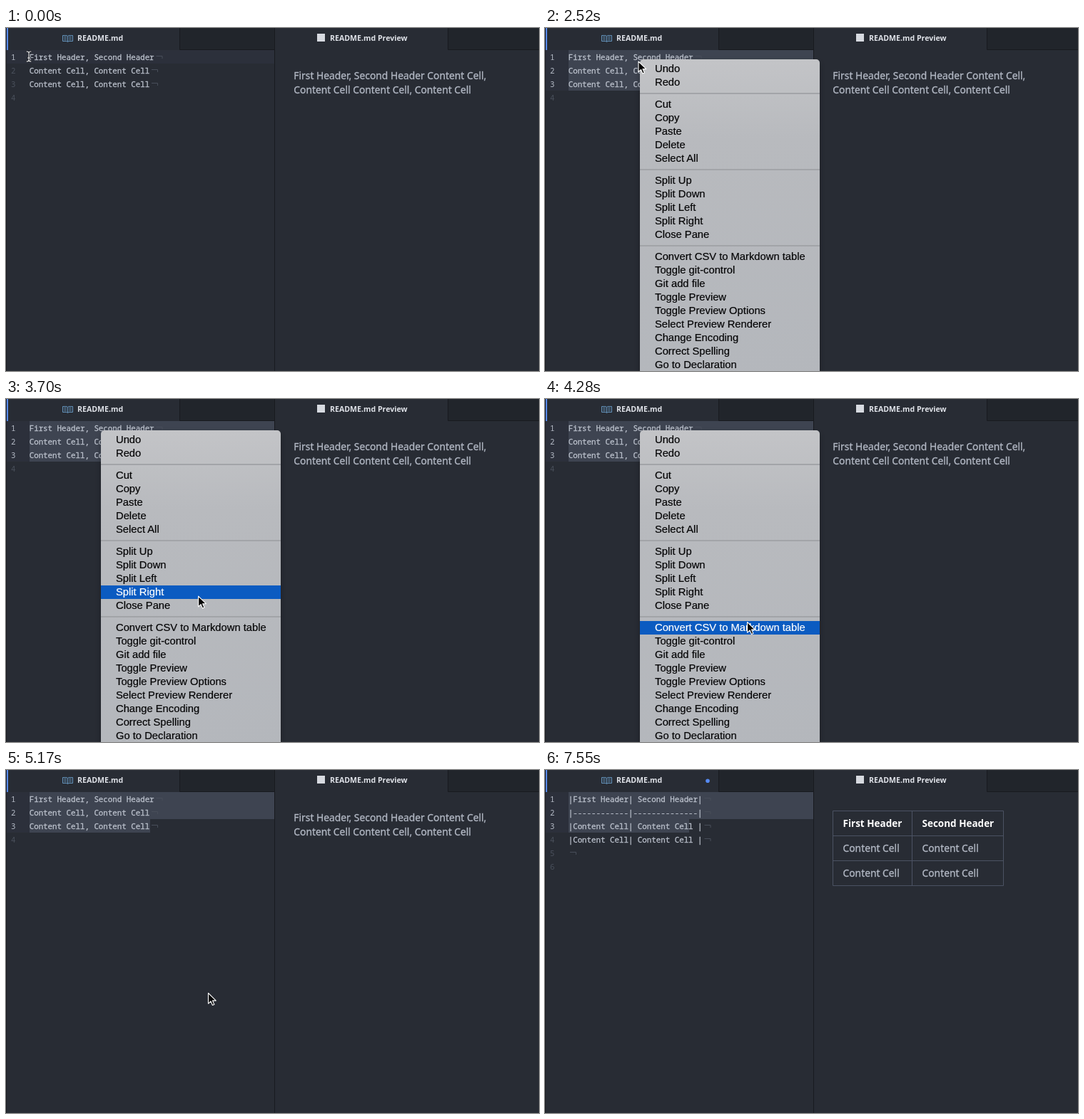
Recreate the animation shown at these times as an HTML page. Size 747x482 px, loop 8630 ms.

```html
<!DOCTYPE html>
<html lang="en">
<head>
<meta charset="utf-8">
<title>CSV to Markdown table</title>
<style>
  html, body { margin: 0; width: 100%; height: 100%; overflow: hidden; background: #282c34; }
  svg { display: block; width: 747px; height: 482px; }
  .tab { font: bold 10.6px "Noto Sans", "Open Sans", sans-serif; fill: #dfe2e8; }
  .code { font: 10.8px "Noto Sans Mono", "DejaVu Sans Mono", monospace; white-space: pre; }
  .line { fill: #bcc2cd; stroke: #bcc2cd; stroke-width: .3; }
  .num { fill: #4a505c; }
  .num.on { fill: #b4bac5; }
  .eol { fill: none; stroke: #484e5a; }
  .view { font: 13.84px "Noto Sans", "Open Sans", sans-serif; fill: #b2b8c4; }
  .view text { stroke: #b2b8c4; stroke-width: .3; }
  .view .head { font-weight: bold; font-size: 13.5px; fill: #fff; stroke: none; }
  .grid { fill: none; stroke: #4b5263; }
  .menu { font: 14.75px "Liberation Sans", Arial, sans-serif; }
  .item { fill: #050506; stroke: #050506; stroke-width: .2; }
  .item.on { fill: #fff; stroke: #fff; }
</style>
</head>
<body>
<svg viewBox="0 0 747 482" xmlns="http://www.w3.org/2000/svg">
  <defs>
    <linearGradient id="glass" x1="0" y1="0" x2="0" y2="1">
      <stop offset="0" stop-color="#c3c4c7"/>
      <stop offset=".25" stop-color="#b8babe"/>
      <stop offset="1" stop-color="#b4b7bc"/>
    </linearGradient>
    <filter id="shade" x="-10%" y="-10%" width="120%" height="120%">
      <feDropShadow dx="0" dy="4" stdDeviation="5" flood-opacity=".28"/>
    </filter>
    <path id="beamShape" d="M-3-7Q0-7 0-5Q0-7 3-7M0-5V5M-3 7Q0 7 0 5Q0 7 3 7M-1.5 2H1.5"/>
  </defs>

  <rect width="747" height="482" fill="#282c34"/>
  <rect id="active" x="1" y="31" width="375" height="19" fill="#2c303b"/>
  <path id="selection" fill="#3e4451"/>
  <g id="editor"></g>

  <g fill="#21252b"><rect x="243" width="133" height="30"/><rect x="619" width="128" height="30"/></g>
  <path d="M.5 0V482M376.5 0V482M243.5 0V30.5H376M619.5 0V30.5H747" fill="none" stroke="#181a1f"/>
  <rect x="1" width="2" height="31" fill="#568af2"/>
  <g fill="none" stroke="#6494bd">
    <path d="M79.5 10.5H85L86.5 11.5 88 10.5H93.5V18.5H88L86.5 19.5 85 18.5H79.5ZM86.5 11.5V19"/>
    <path d="M81 12.5H85M81 14.5H85M81 16.5H85M88 12.5H92M88 14.5H92M88 16.5H92" stroke-opacity=".75"/>
  </g>
  <text class="tab" x="100" y="18">README.md</text>
  <circle id="dirty" cx="228" cy="15.3" r="2.8" fill="#568af2"/>
  <rect x="436" y="8" width="11" height="11" fill="#d7dae0"/>
  <text class="tab" x="454" y="18">README.md Preview</text>

  <g id="plain" class="view">
    <text x="403.3" y="72">First Header, Second Header Content Cell,</text>
    <text x="403.3" y="92">Content Cell Content Cell, Content Cell</text>
  </g>
  <g id="table" class="view">
    <path class="grid" d="M403.5 57.5H642.5V162.5H403.5ZM403.5 92.5H642.5M403.5 127.5H642.5M514.5 57.5V162.5"/>
  </g>

  <g id="menu" class="menu">
    <path d="M133 490V49a5 5 0 0 1 5-5H380a5 5 0 0 1 5 5V490Z" fill="url(#glass)" filter="url(#shade)"/>
    <path d="M133 92H385M133 199H385M133 306H385" stroke="#a2a4a8" stroke-width="2"/>
    <rect id="hover" x="133" width="252" height="19" fill="#0b5bc1"/>
  </g>

  <g id="beam" fill="none" stroke-linecap="round">
    <use href="#beamShape" stroke="#1b1d22" stroke-width="2.6"/>
    <use href="#beamShape" stroke="#f2f3f5" stroke-width="1.1"/>
  </g>
  <path id="arrow" d="M0 0V14.8L3.5 11.5 5.9 17 8.4 15.9 6 10.6H10.8Z" fill="#050505" stroke="#fff" stroke-width="1.1" stroke-linejoin="round"/>
</svg>

<script>
const LOOP = 8630, CHAR = 6.5, ROW = 19, LEFT = 33, TOP = 31;
const $ = id => document.getElementById(id);

const csv = ['First Header, Second Header', 'Content Cell, Content Cell', 'Content Cell, Content Cell', ''];
const md = ['|First Header| Second Header|', '|------------|--------------|',
  '|Content Cell| Content Cell |', '|Content Cell| Content Cell |', '', ''];

const groups = [
  [57, ['Undo', 'Redo']],
  [107, ['Cut', 'Copy', 'Paste', 'Delete', 'Select All']],
  [214, ['Split Up', 'Split Down', 'Split Left', 'Split Right', 'Close Pane']],
  [321, ['Convert CSV to Markdown table', 'Toggle git-control', 'Git add file', 'Toggle Preview',
    'Toggle Preview Options', 'Select Preview Renderer', 'Change Encoding', 'Correct Spelling',
    'Go to Declaration']]
];

// Pointer legs: first step, last step, step count, end point
const legs = [
  [140, 1040, 7, 217, 72],
  [1190, 1190, 1, 218, 76],
  [1340, 1340, 1, 219, 77],
  [1630, 2230, 5, 130, 47],
  [2520, 2520, 1, 131, 47],
  [2820, 3110, 3, 236, 209.5],
  [3250, 3840, 5, 278, 294],
  [3990, 4280, 3, 283.5, 313.5],
  [6660, 7400, 6, 588, 458]
];

function add(parent, tag, attrs, text = '') {
  const el = document.createElementNS('http://www.w3.org/2000/svg', tag);
  for (const key in attrs) el.setAttribute(key, attrs[key]);
  el.textContent = text;
  parent.append(el);
  return el;
}

function buildPage(lines) {
  const page = add($('editor'), 'g', { class: 'code' });
  page.numbers = lines.map((line, i) => {
    const y = TOP + i * ROW + 14;
    add(page, 'text', { class: 'line', x: LEFT - 0.3, y }, line);
    if (i < lines.length - 1) {
      add(page, 'path', { class: 'eol', d: `M${LEFT + line.length * CHAR + 2} ${y - 5.5}h8.5v3.5` });
    }
    return add(page, 'text', { class: 'num', x: 7, y }, i + 1);
  });
  return page;
}

const before = buildPage(csv), after = buildPage(md);

const items = groups.flatMap(([y, labels]) => labels.map((label, i) => {
  const mid = y + i * ROW;
  return { mid, el: add($('menu'), 'text', { class: 'item', x: 154, y: mid + 5 }, label) };
}));

['First Header', 'Second Header'].forEach((title, i) => {
  const x = 417.5 + i * 111;
  add($('table'), 'text', { class: 'head', x, y: 80 }, title);
  add($('table'), 'text', { x, y: 115 }, 'Content Cell');
  add($('table'), 'text', { x, y: 150 }, 'Content Cell');
});

function pointer(t) {
  let x = 32, y = 40;
  for (const [start, end, count, toX, toY] of legs) {
    if (t < start) break;
    const gap = count > 1 ? (end - start) / (count - 1) : 1;
    const p = Math.min(count, Math.floor((t - start) / gap + 0.02) + 1) / count;
    x += (toX - x) * p;
    y += (toY - y) * p;
  }
  return { x, y };
}

function show(el, on) {
  el.style.display = on ? '' : 'none';
}

function place(el, { x, y }) {
  el.setAttribute('transform', `translate(${x} ${y})`);
}

function drawSelection(t) {
  const { x, y } = pointer(Math.min(t, 1190));
  const row = Math.max(0, Math.min(2, Math.floor((y - TOP - 4) / ROW)));
  const col = Math.max(0, Math.min(csv[row].length, Math.round((x - LEFT) / CHAR)));
  const split = TOP + row * ROW;
  const full = row ? `M${LEFT} ${TOP}H376V${split}H${LEFT}Z` : '';
  $('selection').setAttribute('d', `${full}M${LEFT} ${split}h${col * CHAR}v${ROW}H${LEFT}Z`);
  $('active').setAttribute('width', t < 140 ? 375 : LEFT - 1);
  $('active').setAttribute('height', (row + 1) * ROW);
  for (const page of [before, after]) {
    page.numbers.forEach((el, i) => el.classList.toggle('on', i <= row));
  }
}

function drawMenu(t, pos) {
  const open = t >= 2370 && t < 5020;
  show($('menu'), open);
  const live = open && t >= 2820 && t < 4870 && pos.x > 133;
  const hit = live && items.find(({ mid }) => pos.y >= mid - 9 && pos.y < mid + 10);
  show($('hover'), !!hit);
  if (hit) $('hover').setAttribute('y', hit.mid - 9);
  items.forEach(item => item.el.classList.toggle('on', item === hit));
}

function render(t) {
  const pos = pointer(t);
  drawSelection(t);
  drawMenu(t, pos);
  show(before, t < 5310);
  show(after, t >= 5310);
  show($('dirty'), t >= 5610);
  show($('plain'), t < 5760);
  show($('table'), t >= 5760);
  show($('beam'), t < 2520);
  show($('arrow'), t >= 2520 && t < 7550);
  place($('beam'), pos);
  place($('arrow'), pos);
}

const origin = performance.now();
function tick() {
  render((performance.now() - origin) % LOOP);
  requestAnimationFrame(tick);
}
tick();
</script>
</body>
</html>
```
